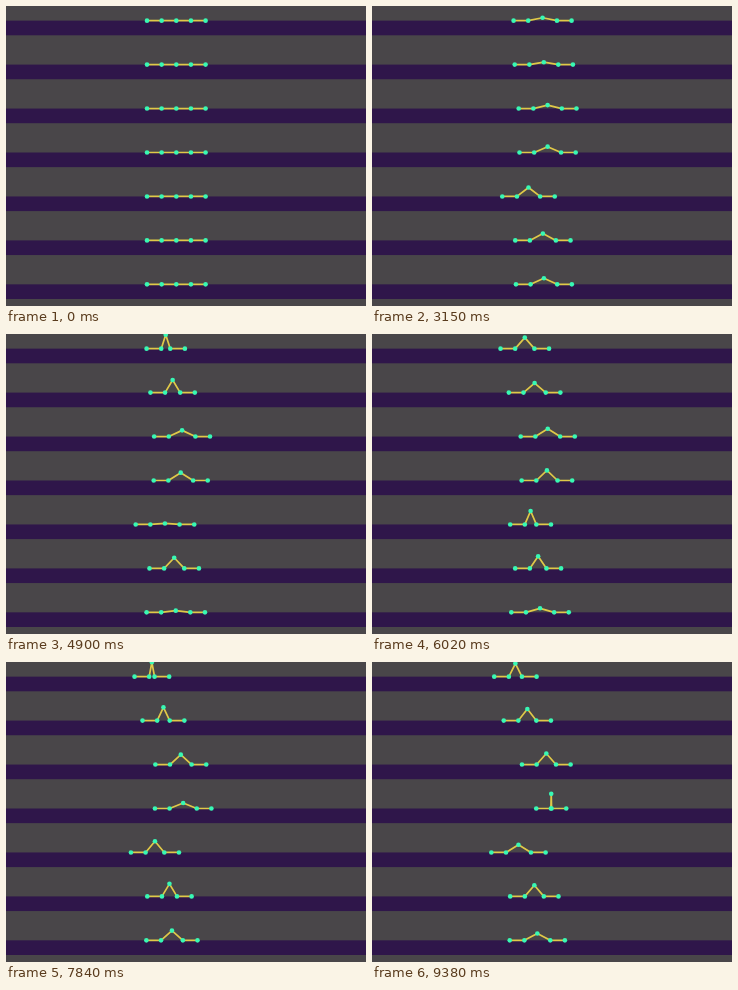
These frames come from a looping animation (360 px wide and 300 px high, 9.45 s). An HTML page with a canvas:

```html
<!DOCTYPE html>
<html lang="en">
<head>
<meta charset="utf-8">
<title>Inchworms</title>
<style>
  html, body { margin: 0; width: 100%; height: 100%; overflow: hidden; background: #494649; }
  canvas { display: block; }
</style>
</head>
<body>
<canvas id="stage" width="360" height="300"></canvas>
<script>
const ctx = document.getElementById('stage').getContext('2d');
const LOOP = 9450, STEP = 70;
const UNIT = 14.65; // link length and band height
const LANE = 3 * UNIT;
const HOME = 170.3;

// drift: travel over one loop; sway and turns: fading swing around it;
// fold and beats: how far and how often the middle links close.
const worms = [
  { drift: -27, sway: 14, turns: 0.8, fold: 40, beats: 2.8 },
  { drift: -15, sway: 10, turns: 0.65, fold: 28, beats: 2.8 },
  { drift: 4, sway: 8, turns: 0.4, fold: 10, beats: 0.5 },
  { drift: 9, sway: 4, turns: 1, fold: 29, beats: 3.5 },
  { drift: -24, sway: 10, turns: 2, fold: 28, beats: 3.9 },
  { drift: -8, sway: 5, turns: 0.65, fold: 20, beats: 0.75 },
  { drift: -5, sway: 5, turns: 0.65, fold: 9, beats: 1.8 }
];

function jointsOf({ drift, sway, turns, fold, beats }, u, y) {
  const center = HOME + drift * u + sway * (1 - u) * Math.sin(2 * Math.PI * turns * u);
  const closing = fold * u * Math.sin(Math.PI * beats * u) ** 2;
  const half = Math.max(0, UNIT - closing / 2);
  const rise = Math.sqrt(UNIT * UNIT - half * half);
  return [
    [center - half - UNIT, y], [center - half, y], [center, y - rise],
    [center + half, y], [center + half + UNIT, y]
  ];
}

function drawWorm(joints) {
  ctx.beginPath();
  joints.forEach(([x, y]) => ctx.lineTo(x, y));
  ctx.stroke();
  for (const [x, y] of joints) {
    ctx.beginPath();
    ctx.arc(x, y, 2.3, 0, Math.PI * 2);
    ctx.fill();
  }
}

function draw(now) {
  const u = Math.floor((now % LOOP) / STEP) * STEP / LOOP;
  ctx.fillStyle = '#494649';
  ctx.fillRect(0, 0, 360, 300);
  ctx.fillStyle = '#2f164a';
  worms.forEach((_, i) => ctx.fillRect(0, UNIT + i * LANE, 360, UNIT));

  ctx.strokeStyle = '#e0c948';
  ctx.fillStyle = '#38f8b4';
  ctx.lineWidth = 1.7;
  ctx.lineJoin = 'round';
  worms.forEach((worm, i) => drawWorm(jointsOf(worm, u, UNIT + i * LANE)));
}

const start = performance.now();
function tick() {
  draw(performance.now() - start);
  requestAnimationFrame(tick);
}
tick();
</script>
</body>
</html>
```
